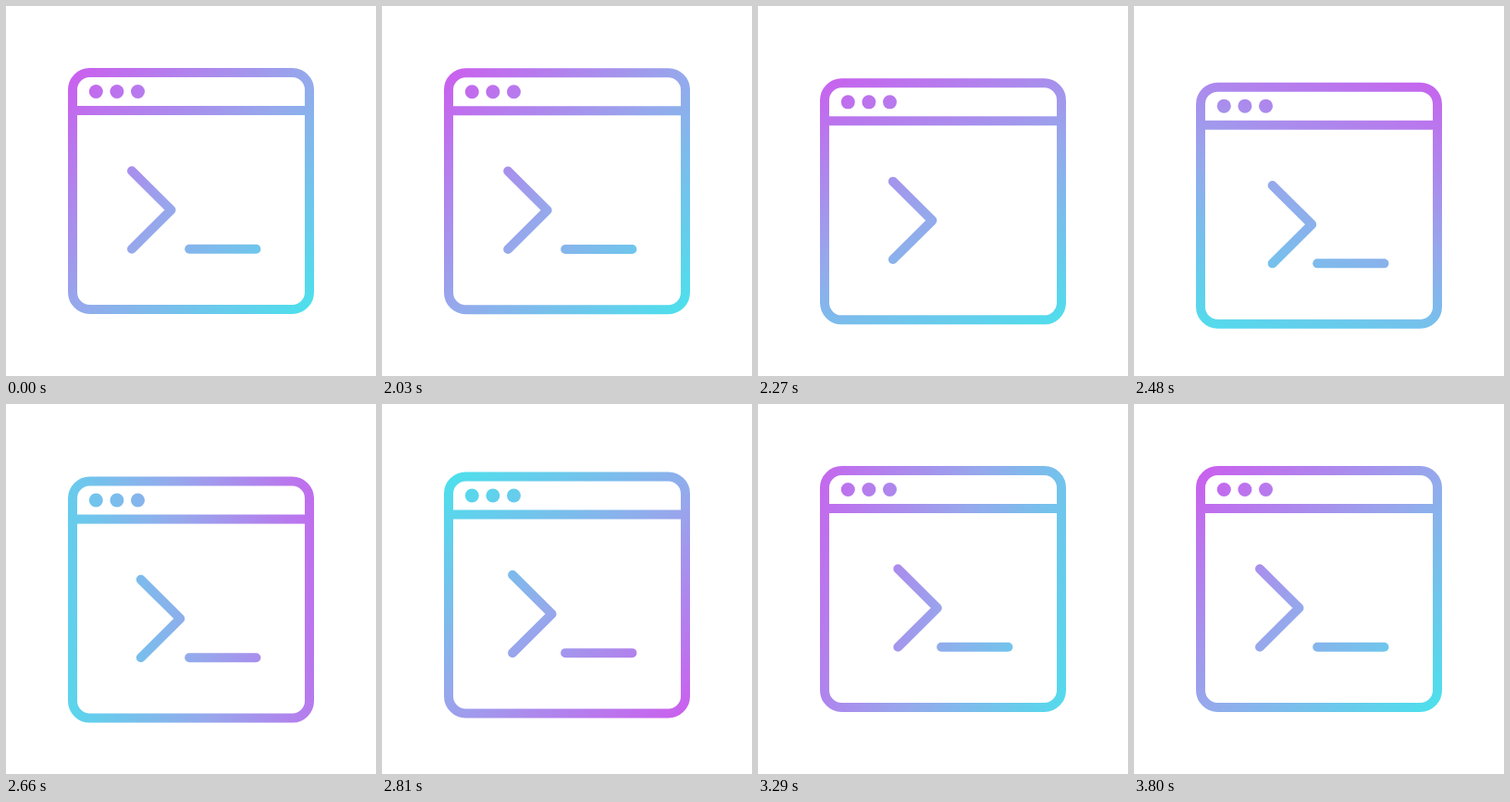
An HTML page that plays this animation: 400 px wide and 400 px high, repeating every 3.86 s.

```html
<!DOCTYPE html>
<html lang="en">
<head>
<meta charset="utf-8">
<title>Terminal window</title>
<style>
  html, body { margin: 0; width: 100%; height: 100%; overflow: hidden; background: #fff; }
  svg { display: block; width: 100vw; height: 100vh; }
</style>
</head>
<body>
<svg viewBox="0 0 400 400">
  <defs>
    <linearGradient id="tint" gradientUnits="userSpaceOnUse" x1="69" y1="69" x2="331" y2="331">
      <stop offset="0" stop-color="#cb5eee"/>
      <stop offset=".5" stop-color="#96a8ec"/>
      <stop offset="1" stop-color="#4be1ec"/>
    </linearGradient>
  </defs>
  <g id="app" fill="none" stroke="url(#tint)" stroke-width="10" stroke-linecap="round" stroke-linejoin="round">
    <rect x="72" y="72" width="256" height="256" rx="18.5"/>
    <path d="M72 113H328" stroke-linecap="butt"/>
    <g fill="url(#tint)" stroke="none">
      <circle cx="97.3" cy="92.5" r="7.5"/>
      <circle cx="119.9" cy="92.5" r="7.5"/>
      <circle cx="142.5" cy="92.5" r="7.5"/>
    </g>
    <path id="prompt" d="M136 178.3L178.5 220.5L136 262.7"/>
    <path id="cursor" d="M198.2 262.7H270.4"/>
  </g>
</svg>
<script>
  const LOOP = 3860, HOLD = 2030, STEP = 30, STEPS = 60;
  const [tint, app, prompt, cursor] =
    ['tint', 'app', 'prompt', 'cursor'].map(id => document.getElementById(id));

  const clamp = v => Math.min(1, Math.max(0, v));
  const smooth = v => { v = clamp(v); return v * v * (3 - 2 * v); };
  // Rises from a to b, falls from b to c.
  const hop = (k, a, b, c) => k < b ? smooth((k - a) / (b - a)) : 1 - smooth((k - b) / (c - b));

  // Cubic bezier (p1, 0, p2, 1), solved by bisection.
  function ease(x, p1, p2) {
    if (x <= 0 || x >= 1) return clamp(x);
    let lo = 0, hi = 1;
    for (let i = 0; i < 24; i++) {
      const s = (lo + hi) / 2, r = 1 - s;
      if (3 * p1 * s * r * r + 3 * p2 * s * s * r + s * s * s < x) lo = s;
      else hi = s;
    }
    return smooth(lo);
  }

  function draw(t) {
    const k = t < HOLD ? 0 : Math.min(STEPS, Math.floor((t - HOLD) / STEP) + 1);
    const turn = 360 * ease((k - 1) / 53, 0.4, 0.55);
    const dip = 16 * hop(k, 0, 14, 37);
    const nudge = k < 36 ? 14 * hop(k, 0, 14, 36) : 16 * hop(k, 36, 44, 60);
    tint.setAttribute('gradientTransform', `rotate(${turn} 200 200)`);
    app.setAttribute('transform', `translate(0 ${dip})`);
    prompt.setAttribute('transform', `translate(${nudge} 0)`);
    cursor.setAttribute('visibility', k >= 5 && k < 15 ? 'hidden' : 'visible');
  }

  const start = performance.now();
  function tick() {
    draw((performance.now() - start) % LOOP);
    requestAnimationFrame(tick);
  }
  tick();
</script>
</body>
</html>
```
